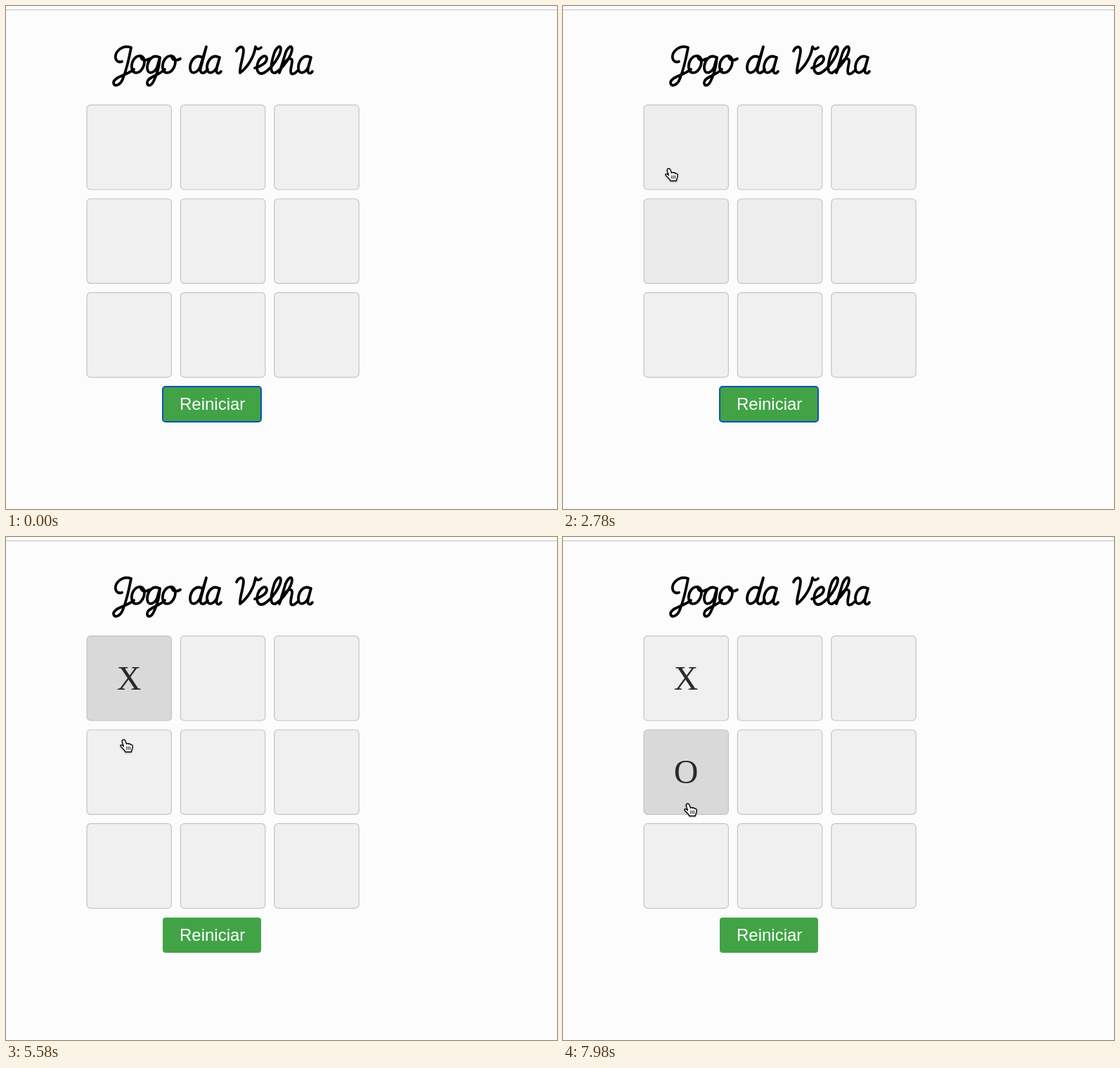
An HTML page that plays this animation: 784 px wide and 715 px high, repeating every 8 s.

```html
<!DOCTYPE html>
<html lang="pt">
<head>
<meta charset="utf-8">
<title>Jogo da Velha</title>
<style>
  html, body { margin: 0; width: 100%; height: 100%; overflow: hidden; background: #fcfcfc; }
  svg { display: block; width: 784px; height: 715px; }
  #title { fill: none; stroke: #000; stroke-width: 3.8; stroke-linecap: round; stroke-linejoin: round; }
  .cell { stroke: #c3c3c6; stroke-width: 1.2; }
  .mark { font: 48px "Liberation Serif", serif; fill: #2a2a2a; text-anchor: middle; }
  .label { font: 24px "Liberation Sans", sans-serif; fill: #fff; }
  #hand { fill: #fff; stroke: #000; stroke-width: 1.5; stroke-linejoin: round; stroke-linecap: round; }
  #arrow { fill: #000; stroke: #fff; stroke-width: 1.4; }
  #cursor { filter: drop-shadow(0 1px 1px rgba(0, 0, 0, .3)); }
</style>
</head>
<body>
<svg viewBox="0 0 784 715">
  <path d="M0 5.5H784" stroke="#bdbdca" stroke-width="1.2"/>
  <g id="title" role="img" aria-label="Jogo da Velha"></g>
  <g id="board"></g>
  <rect x="223" y="541" width="140" height="50" rx="4" fill="#41a346"/>
  <rect id="focus" x="223" y="541" width="140" height="50" rx="4" fill="none" stroke="#0b50b8" stroke-width="2"/>
  <text class="label" x="247" y="574">Reiniciar</text>
  <text class="mark" id="x" x="175" y="217">X</text>
  <text class="mark" id="o" x="175" y="350">O</text>
  <g id="cursor">
    <g id="hand" transform="translate(-.5 0) scale(.92)">
      <path d="M-1 1C1-1 3 0 4 3L5.5 7C6 5.5 8.3 5.5 8.7 7C9.5 6 11.6 6.4 11.8 8C13.2 7.3 15 8.3 14.8 10.5C15 14 13 15 13 19H3.5C3 16.5-.5 14-3.5 10.5C-5 8-2 7 1 10.5L-1 4.5C-1.6 3-1.6 2-1 1Z"/>
      <path d="M5.8 11V15.5M8.3 11V15.5M10.8 11V15.5" stroke-width="1"/>
    </g>
    <path id="arrow" d="M0 0V16L3.7 12.5L6 18L8.5 17L6.2 11.7H11.3Z"/>
  </g>
</svg>
<script>
const LOOP = 8000, FADE = 300, X_CLICK = 4800, O_CLICK = 7260;
const LEFT = 115, TOP = 140.6, PITCH = 133.4, SIZE = 120.4;
const $ = id => document.getElementById(id);

function draw(parent, tag, attrs) {
  const node = document.createElementNS("http://www.w3.org/2000/svg", tag);
  for (const name in attrs) node.setAttribute(name, attrs[name]);
  return $(parent).appendChild(node);
}

// Script letters share a bowl (a, d, g) and a tall loop (l, h).
const bowl = "c-9-5-16 4-17 13c-1 12 9 11 14 1";
const loop = "c11-6 24-25 24-34c0-7-7-2-10 8";
const letters = {
  J: "c-10 3-12-9-5-16c5-5 12-6 18-4c-3 16-7 33-12 45c-4 10-13 11-13 5c0-8 18-10 29-19",
  o: "c-9-1-14 9-13 17c1 9 10 9 15 1c5-8 3-17-2-18c0 7 7 7 12 4",
  a: bowl + "l4-14l-4 15c-2 9 3 9 6 5",
  d: bowl + "l9-29l-8 30c-2 8 4 10 10 2",
  g: bowl + "l4-14c-1 13-5 26-9 34c-4 8-10 7-9 1c1-7 16-9 25-18",
  V: "c3-7 10-8 10-1c0 9-6 24-5 32c11-8 20-23 22-37c2 4 5 4 8 1",
  e: "c9-2 18-8 17-14c-1-6-10-2-13 8c-3 12 3 16 9 13",
  l: loop + "c-4 13-6 27 1 26",
  h: loop + "l-8 26c4-12 11-21 16-20c6 1-3 17 1 21c3 2 7-2 10-5"
};
const write = (letter, x, y = 73) => draw("title", "path", { d: `M${x} ${y}${letters[letter]}` });
write("J", 165, 79);
write("o", 192, 71);
write("g", 218);
write("o", 236, 71);
write("d", 279);
write("a", 303);
write("V", 328, 64);
write("e", 354, 88);
write("l", 367, 95);
write("h", 383, 95);
write("a", 433);

const cells = Array.from({ length: 9 }, (_, i) => draw("board", "rect", {
  class: "cell", x: LEFT + i % 3 * PITCH, y: TOP + Math.floor(i / 3) * PITCH,
  width: SIZE, height: SIZE, rx: 5.5
}));

// Key points of the pointer tip: time, x, y
const path = [
  [0, 500, 740], [500, 472, 590], [1000, 420, 500], [1520, 411, 488], [2100, 404, 480],
  [2580, 240, 330], [2780, 150, 231], [3480, 162, 199], [5540, 166, 222],
  [5580, 167, 288], [6000, 167, 340], [6880, 168, 351], [LOOP, 177, 379]
];

function tipAt(t) {
  const n = path.findIndex(step => step[0] > t);
  const [t0, x0, y0] = path[n - 1], [t1, x1, y1] = path[n];
  const k = (t - t0) / (t1 - t0);
  return [x0 + (x1 - x0) * k, y0 + (y1 - y0) * k];
}

function cellAt([x, y]) {
  const u = (x - LEFT) / PITCH, v = (y - TOP) / PITCH, edge = SIZE / PITCH;
  const inside = u >= 0 && v >= 0 && u < 3 && v < 3 && u % 1 < edge && v % 1 < edge;
  return inside ? Math.floor(v) * 3 + Math.floor(u) : -1;
}

// Hover periods follow from where the pointer is.
const visits = [];
for (let t = 0; t < LOOP; t += 5) {
  const cell = cellAt(tipAt(t)), last = visits.at(-1);
  if (last?.cell === cell) last.end = t + 5;
  else visits.push({ cell, start: t, end: t + 5 });
}

function fade(ms) {
  const k = Math.max(0, Math.min(1, ms / FADE));
  return k * k * (3 - 2 * k);
}

function shade(cell, t) {
  const levels = visits.filter(v => v.cell === cell).map(({ start, end }) =>
    fade(Math.min(t, end) - start) * (1 - fade(t - end)));
  return Math.round(240 - 23 * Math.max(0, ...levels));
}

const show = (id, on) => $(id).setAttribute("visibility", on ? "visible" : "hidden");

function render(t) {
  cells.forEach((rect, i) => {
    const v = shade(i, t);
    rect.setAttribute("fill", `rgb(${v},${v},${v})`);
  });
  const tip = tipAt(t), overCell = cellAt(tip) >= 0;
  $("cursor").setAttribute("transform", `translate(${tip.map(Math.round)})`);
  show("hand", overCell);
  show("arrow", !overCell);
  show("focus", t < X_CLICK);
  show("x", t >= X_CLICK);
  show("o", t >= O_CLICK);
}

function tick() {
  render(performance.now() % LOOP);
  requestAnimationFrame(tick);
}
tick();
</script>
</body>
</html>
```
